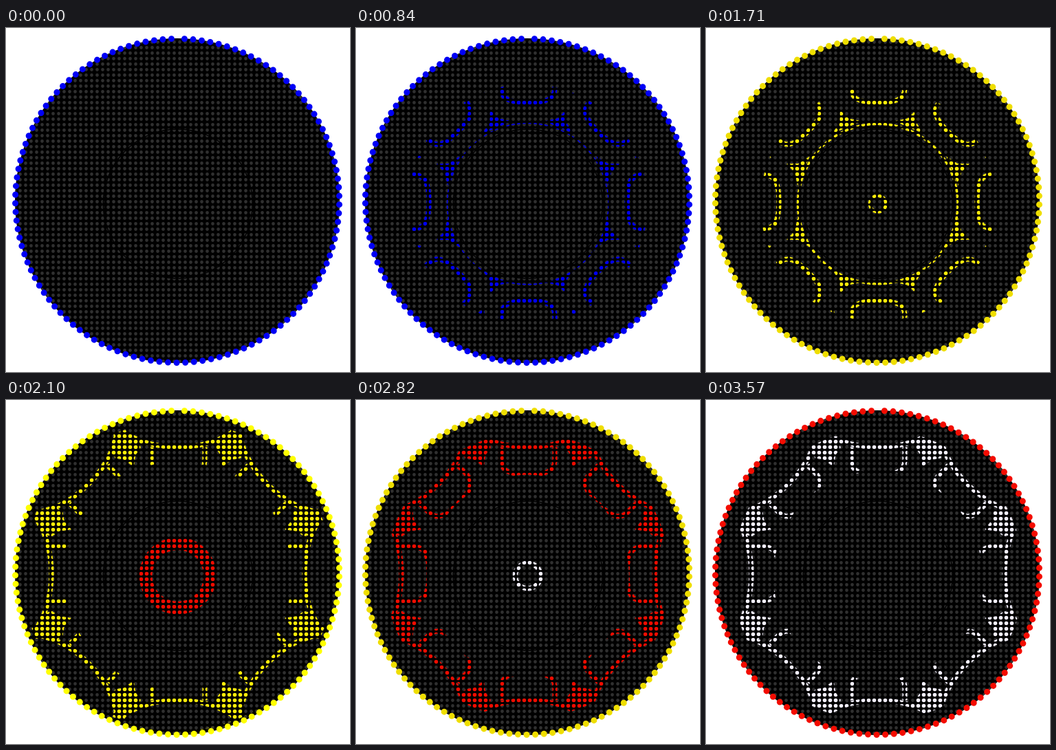
Write an HTML page with a canvas that moves like this. It is 500 by 500 pixels and loops after 3600 ms.

```html
<!DOCTYPE html>
<html lang="en">
<head>
<meta charset="utf-8">
<title>LED ripple</title>
<style>
html, body { margin: 0; width: 100%; height: 100%; overflow: hidden; background: #fff; }
canvas { display: block; }
</style>
</head>
<body>
<canvas id="stage" width="500" height="500"></canvas>
<script>
const SIZE = 500, LOOP = 3600, STEP = 30, PITCH = 8, TAU = Math.PI * 2;
const rim = { x: 249, y: 251, r: 235.5, dots: 117, dotR: 4.5, gap: 0.0805 };
const source = { x: 249.8, y: 255.5 };
const pattern = { x: 250, y: 252.5 };

const BLUE = [0, 0, 245], YELLOW = [255, 238, 10], GOLD = [239, 222, 0],
  RED = [243, 12, 0], WHITE = [245, 241, 255];

// A wave grows to REACH over its span; ease is the power of its growth.
const REACH = 250;
const waves = [
  { start: 0, span: 1321, ease: 0.8, color: BLUE },
  { start: 840, span: 1444, ease: 0.75, color: YELLOW },
  { start: 1320, span: 1648, ease: 2, color: YELLOW, fades: [{ at: 1710, span: 240, to: RED }] },
  { start: 2733, span: 987, ease: 1, color: WHITE }
];
const rimFades = [
  { at: 1110, span: 420, to: GOLD },
  { at: 2010, span: 90, to: [255, 255, 0] },
  { at: 2100, span: 90, to: GOLD },
  { at: 2850, span: 450, to: RED }
];

function layer() {
  const canvas = document.createElement('canvas');
  canvas.width = canvas.height = SIZE;
  return canvas.getContext('2d');
}

function tint(color, fades, t) {
  for (const { at, span, to } of fades) {
    const k = Math.min(1, Math.max(0, (t - at) / span));
    color = color.map((v, n) => v + (to[n] - v) * k);
  }
  return `rgb(${color.map(Math.round).join(',')})`;
}

function circle(g, x, y, r) {
  g.moveTo(x + r, y);
  g.arc(x, y, r, 0, TAU);
}

function dotGrid(g, radius) {
  const first = PITCH / 2 + 0.5;
  g.beginPath();
  for (let y = first; y < SIZE; y += PITCH)
    for (let x = first; x < SIZE; x += PITCH) circle(g, x, y, radius);
  g.fill();
}

// Fills a half outline together with its mirror image.
function mirrored(g, half) {
  g.beginPath();
  half.forEach(([x, y]) => g.lineTo(x, y));
  [...half].reverse().forEach(([x, y]) => g.lineTo(-x, y));
  g.fill();
}

function petal(g) {
  g.beginPath();
  g.moveTo(-39, -184);
  g.lineTo(-39, -164);
  g.bezierCurveTo(-38, -150, -28, -144, 0, -144);
  g.bezierCurveTo(28, -144, 38, -150, 39, -164);
  g.lineTo(39, -184);
  g.stroke();
  const spread = 0.48;
  g.beginPath();
  g.arc(0, -349, 165, TAU / 4 - spread, TAU / 4 + spread);
  g.stroke();
}

// The dots that the waves are able to light.
function litDots() {
  const g = layer();
  g.lineWidth = 7;
  g.beginPath();
  circle(g, source.x, source.y, 118);
  g.fill();
  g.save();
  g.translate(pattern.x, pattern.y);
  for (let i = 0; i < 8; i++) {
    petal(g);
    g.rotate(TAU / 16);
    mirrored(g, [[0, -144], [7, -128], [23, -117]]);
    mirrored(g, [[0, -168], [9, -183], [20, -190], [22, -206], [10, -220], [6, -236]]);
    g.rotate(TAU / 16);
  }
  g.restore();
  g.beginPath();
  g.arc(rim.x, rim.y, 233, 0, TAU);
  g.lineWidth = 6;
  g.stroke();

  const dots = layer();
  dotGrid(dots, 2.8);
  g.globalCompositeOperation = 'destination-in';
  g.drawImage(dots.canvas, 0, 0);
  return g.canvas;
}

function backdrop() {
  const g = layer();
  g.fillStyle = '#fff';
  g.fillRect(0, 0, SIZE, SIZE);
  g.beginPath();
  circle(g, rim.x, rim.y, 236);
  g.fillStyle = '#000';
  g.fill();
  g.clip();
  g.fillStyle = '#303030';
  dotGrid(g, 2.4);
  g.beginPath();
  circle(g, source.x, source.y, 108.5);
  g.lineWidth = 1.5;
  g.stroke();
  return g.canvas;
}

const stage = document.getElementById('stage').getContext('2d');
const board = backdrop();
const lit = litDots();
const scratch = layer();

function drawWave({ start, span, ease, color, fades = [] }, t) {
  if (t <= start) return;
  const outer = REACH * ((t - start) / span) ** ease;
  const inner = Math.max(outer * 0.67, outer - 60);
  scratch.globalCompositeOperation = 'copy';
  scratch.fillStyle = tint(color, fades, t);
  scratch.beginPath();
  circle(scratch, source.x, source.y, outer);
  circle(scratch, source.x, source.y, inner);
  scratch.fill('evenodd');
  scratch.globalCompositeOperation = 'destination-in';
  scratch.drawImage(lit, 0, 0);
  stage.drawImage(scratch.canvas, 0, 0);
}

// The chain of dots leaves a slightly wider gap at the top.
function drawRim(t) {
  const first = rim.gap / 2 + 0.004;
  const step = (TAU - rim.gap) / (rim.dots - 1);
  stage.fillStyle = tint(BLUE, rimFades, t);
  stage.beginPath();
  for (let i = 0; i < rim.dots; i++) {
    const a = first + i * step;
    circle(stage, rim.x + rim.r * Math.sin(a), rim.y - rim.r * Math.cos(a), rim.dotR);
  }
  stage.fill();
}

function draw(t) {
  stage.drawImage(board, 0, 0);
  waves.forEach(wave => drawWave(wave, t));
  drawRim(t);
}

const begin = performance.now();
function tick() {
  const elapsed = (performance.now() - begin) % LOOP;
  draw(Math.floor(elapsed / STEP) * STEP);
  requestAnimationFrame(tick);
}
tick();
</script>
</body>
</html>
```
